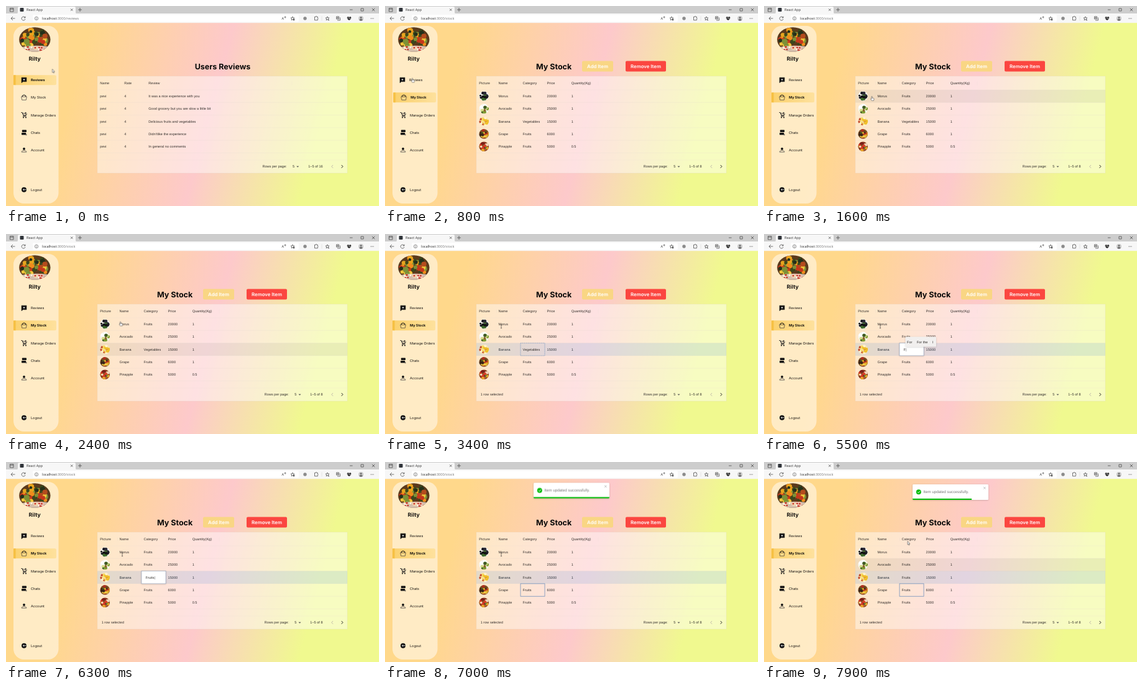
Recreate the animation shown at these times as an HTML page. Size 600 by 322 pixels, loop 8 s.

```html
<!DOCTYPE html>
<html lang="en">
<head>
<meta charset="utf-8">
<title>Stock dashboard</title>
<style>
html, body { margin: 0; height: 100%; overflow: hidden; }
svg { display: block; width: 100vw; height: 100vh; text-rendering: geometricPrecision; }
text { white-space: pre; }
.grid { font: 5.47px "Liberation Sans", Arial, sans-serif; letter-spacing: .01071em; fill: #2c2926; }
.ui { font: 5.5px Inter, sans-serif; fill: #151310; }
.bold { font-weight: 700; }
.title { font: 700 12.5px Inter, sans-serif; fill: #080808; }
.btn { font: 600 7.8px Inter, sans-serif; fill: #fff; }
.chrome { font: 5.6px "Open Sans", sans-serif; fill: #333; }
.toast-text { font: 6.25px "Liberation Sans", Arial, sans-serif; fill: #757575; }
.line { fill: none; stroke: #3c3c3c; stroke-width: .7; }
.rule { stroke: #dcd3cb; stroke-opacity: .55; stroke-width: .4; }

#cursor, #toast, #bar, .nudge-stock, .nudge-reviews, #caret { animation: 8s linear infinite; }
#cursor { animation-name: cursor; animation-timing-function: ease-in-out; }
@keyframes cursor {
  0%, 1.25% { transform: translate(74.5px, 101.5px); }
  5%, 7.5% { transform: translate(50px, 145px); }
  10%, 11% { transform: translate(43.5px, 116.5px); }
  18.75% { transform: translate(170px, 140px); }
  23.75%, 27% { transform: translate(192px, 184px); }
  30%, 33% { transform: translate(183.5px, 141.5px); }
  36.25%, 94% { transform: translate(187px, 149px); }
  98.5%, 100% { transform: translate(231px, 127.5px); }
}
.nudge-stock { animation-name: nudge-stock; }
@keyframes nudge-stock {
  0%, 3% { transform: none; }
  6%, 10% { transform: translateX(1.2px); }
  12%, 100% { transform: none; }
}
.nudge-reviews { animation-name: nudge-reviews; }
@keyframes nudge-reviews {
  0%, 7.5% { transform: none; }
  9.5%, 10.5% { transform: translateX(-1px); }
  12%, 100% { transform: none; }
}
#toast { animation-name: toast; animation-timing-function: cubic-bezier(.215, .61, .355, 1); }
@keyframes toast {
  0%, 80.84% { opacity: 0; transform: translateY(-1172px); }
  86.09% { opacity: 1; transform: translateY(9.8px); }
  87.4% { transform: translateY(-3.9px); }
  88.71% { transform: translateY(1.95px); }
  89.59%, 100% { opacity: 1; transform: none; }
}
#bar { transform-origin: 239px 0; animation-name: bar; }
@keyframes bar {
  0%, 89.4% { transform: none; }
  100% { transform: scaleX(.75); }
}
</style>
</head>
<body>
<svg id="stage" viewBox="0 0 600 322" preserveAspectRatio="none"></svg>
<script>
const LOOP = 8000, SWITCH = 600, PICK = 3000, EDIT = 4700, SAVE = 6400;
const sheet = document.head.appendChild(document.createElement('style'));
let windows = 0;

// Group that is visible only between two times
function during(from, to, body) {
  const name = 'w' + windows++, pct = ms => ms / LOOP * 100 + '%';
  sheet.textContent += `@keyframes ${name}{0%{opacity:0}${pct(from)}{opacity:1}${pct(to)}{opacity:0}}
    .${name}{animation:${name} 8s step-end infinite}`;
  return `<g class="${name}">${body}</g>`;
}
const text = (x, y, str, cls = 'grid', more = '') =>
  `<text x="${x}" y="${y}" class="${cls}" ${more}>${str}</text>`;
const rect = (x, y, w, h, fill, more = '') =>
  `<rect x="${x}" y="${y}" width="${w}" height="${h}" fill="${fill}" ${more}/>`;
const disc = (x, y, r, fill, more = '') =>
  `<circle cx="${x}" cy="${y}" r="${r}" fill="${fill}" ${more}/>`;
const path = (d, more = 'class="line"') => `<path d="${d}" ${more}/>`;
const at = (x, y, body, more = '') => `<g transform="translate(${x} ${y})" ${more}>${body}</g>`;

function random(seed) {
  return () => (seed = (seed * 16807) % 2147483647) / 2147483647;
}
// Soft heap of coloured blobs inside an ellipse
function heap(id, cx, cy, rx, ry, base, colours, count, size, seed) {
  const rnd = random(seed);
  let blobs = '';
  for (let i = 0; i < count; i++) {
    const a = rnd() * 6.283, d = Math.sqrt(rnd()) * .85;
    blobs += disc((cx + Math.cos(a) * d * rx).toFixed(1), (cy + Math.sin(a) * d * ry).toFixed(1),
      (size * (.6 + rnd() * .7)).toFixed(1), colours[i % colours.length]);
  }
  const oval = `<ellipse cx="${cx}" cy="${cy}" rx="${rx}" ry="${ry}"`;
  return `<clipPath id="${id}">${oval}/></clipPath>${oval} fill="${base}"/><g clip-path="url(#${id})">${blobs}</g>`;
}

function browser() {
  const url = page => text(58, 21.9, `<tspan fill="#222">localhost</tspan><tspan fill="#777">:3000/${page}</tspan>`, 'chrome');
  const star = 'M0-3 .9-1 3-.8 1.4.6 1.9 2.8 0 1.6-1.9 2.8-1.4.6-3-.8-.9-1Z';
  return rect(0, 0, 600, 13, '#cdcdcd') + rect(0, 12, 600, 15.2, '#f7f7f7')
    + path('M17 13Q19 12 19 10V3Q19 1 21 1H110Q112 1 112 3V10Q112 12 114 13Z', 'fill="#f7f7f7"')
    + rect(43, 14.3, 428, 11.2, '#fff', 'rx="2"')
    + path('M6.5 3.5H12V9H6.5ZM6.5 5.2H12') + rect(22.5, 3, 6, 6, '#30343a', 'rx="1"')
    + text(33, 8.2, 'React App', 'chrome')
    + path('M104 4.4 107.4 7.8M107.4 4.4 104 7.8M116 6H122M119 3V9')
    + path('M553 6H557.5M571 4H575V8H571ZM588.8 3.8 593.2 8.2M593.2 3.8 588.8 8.2')
    + path('M14.5 20H8M11 17 8 20 11 23')
    + path('M30.8 18.8A3 3 0 1 0 31 21M31 16.7V19H28.7')
    + at(49, 20, disc(0, 0, 2.7, 'none', 'stroke="#555" stroke-width=".6"') + path('M0-.4V1.5M0-1.5V-.9'))
    + during(0, SWITCH, url('reviews')) + during(SWITCH, LOOP, url('stock'))
    + text(443.5, 22, 'A', 'chrome') + path('M448 17Q449 18 448 19M449.2 16.4Q450.8 18 449.2 19.6')
    + at(461, 20, path(star) + disc(2, 2, 1.4, '#555'))
    + disc(481, 20, 2.7, '#8b8b8b')
    + path('M496.5 17.5H498A1 1 0 0 1 500 17.5H501.3V19.3A1 1 0 0 1 501.3 21.2V22.8H496.5Z')
    + path('M508 16.5V23.5', 'stroke="#ccc" stroke-width=".5"')
    + at(517, 20, path(star) + path('M1 2.7H3.2'))
    + path('M531.5 17H535.5V21H531.5ZM533 23H537.5V18.5M533.5 17.8V20.2M532.3 19H534.7')
    + path('M552 23C546 19 549.5 15.5 552 18C554.5 15.5 558 19 552 23Z', 'fill="#222"')
    + path('M549 19.7H551L552 18.5 553 21 554 19.7H555.5', 'fill="none" stroke="#fff" stroke-width=".5"')
    + disc(571, 20, 4, '#c9c9c9') + disc(571, 18.8, 1.4, '#666')
    + path('M568.2 22.6Q571 19 573.8 22.6Q571 25 568.2 22.6Z', 'fill="#666"')
    + [587, 589, 591].map(x => disc(x, 20, .55, '#333')).join('');
}

const icons = {
  reviews: path('M-4-4H4V2.6H-1.8L-4 4.6Z', 'stroke="#111" stroke-width=".5" stroke-linejoin="round"')
    + path('M0-2.5.6-1.1 2-.6.6-.1 0 1.4-.6-.1-2-.6-.6-1.1Z', 'fill="#fff"'),
  stock: path('M-4.3-1.2H4.3L3.3 4H-3.3Z')
    + path('M-2.8-1.2V-2.5Q0-5.5 2.8-2.5V-1.2', 'fill="none" stroke="#111" stroke-width="1.1"')
    + path('M-2 1.2H2M-2 2.6H2', 'stroke="#fde6b6" stroke-width=".5"'),
  orders: path('M-4.5-4H-2.9L-.8.8H3L4.4-2', 'fill="none" stroke="#111" stroke-width="1"')
    + path('M-2-2.8H1.2L2.4.8H-.6Z') + path('M-.6.8-1.5 2.4H3.6', 'fill="none" stroke="#111" stroke-width=".8"')
    + disc(-1, 4, .95, '#111') + disc(3, 4, .95, '#111') + path('M1.2-3.2H4M2.6-4.6V-1.8', 'stroke="#111" stroke-width=".8"'),
  chats: rect(-3.2, -4, 7.2, 3.5, '#111', 'rx=".8"') + rect(-4, .4, 7.2, 3.6, '#111', 'rx=".8"')
    + path('M2 3H4V4.6Z'),
  account: disc(0, -1.8, 1.9, '#111') + path('M-3.8 3.5V2.4Q0-.8 3.8 2.4V3.5Z'),
  logout: disc(0, 0, 4, '#111') + path('M3.5 0H-1.5M.2-1.6-1.6 0 .2 1.6', 'fill="none" stroke="#fff" stroke-width=".8"')
};

function menuItem(y, label, icon, active) {
  const glow = active
    ? rect(12, y - 8, 69, 16, 'url(#active)', 'rx="2.5"') + rect(12, y - 8, 3.6, 16, '#f6c043')
    : '';
  return glow + at(29, y, icons[icon], 'fill="#111"') + text(40, y + 2, label, active ? 'ui bold' : 'ui');
}

function sidebar() {
  const toggled = (y, label, icon, from, to) => {
    const on = during(from, to, menuItem(y, label, icon, true));
    const off = from ? during(0, from, menuItem(y, label, icon)) : during(to, LOOP, menuItem(y, label, icon));
    return `<g class="nudge-${icon}">${on}${off}</g>`;
  };
  const rnd = random(41);
  let berries = '';
  for (let i = 0; i < 16; i++) {
    berries += disc((31 + rnd() * 31).toFixed(1), (65 + rnd() * 7).toFixed(1), 1.3, i % 3 ? '#c92a20' : '#fff3e6');
  }
  return rect(12, 32, 72.5, 286, '#fff', 'rx="17" fill-opacity=".5"')
    + heap('avatar', 46.3, 54, 25.2, 19.8, '#5b3a1c',
      ['#e8a51e', '#3b481c', '#f0c63a', '#c6361c', '#24301a', '#ef8d1c', '#7d9136', '#b44b1d'], 72, 3.6, 977)
    + `<g clip-path="url(#avatar)">${path('M20 67Q46 61 73 66V76H20Z', 'fill="#f3dfd0" fill-opacity=".8"')}${berries}</g>`
    + text(46.2, 88.3, 'Rilty', 'ui', 'text-anchor="middle" style="font-size:8.7px;font-weight:700"')
    + toggled(119.2, 'Reviews', 'reviews', 0, SWITCH)
    + toggled(147.3, 'My Stock', 'stock', SWITCH, LOOP)
    + menuItem(175.5, 'Manage Orders', 'orders') + menuItem(203.6, 'Chats', 'chats')
    + menuItem(231.7, 'Account', 'account') + menuItem(295.7, 'Logout', 'logout');
}

const ROW = 20.3, TOP = 135;
const rowY = i => TOP + i * ROW;
const baseline = i => rowY(i) + 12.1;
const shade = (i, fill) => rect(147, rowY(i), 402, ROW, fill);

function table(cols, heads, rows, ends, total, shift) {
  let out = rect(147, 113, 402, 156, '#fff', 'fill-opacity=".45"')
    + rect(147, 113, 402, 156, 'none', 'class="rule"');
  for (let i = 0; i <= 5; i++) out += path(`M147 ${rowY(i)}H549`, 'class="rule"');
  out += path('M147 248H549', 'class="rule"');
  out += ends.map(x => path(`M${x} 121.5V127.5`, 'class="rule"')).join('');
  heads.forEach((h, c) => out += text(cols[c], 126.4, h));
  rows.forEach((row, i) => row.forEach((cell, c) => out += text(cols[c], baseline(i), cell)));
  return out + text(412.5 + shift, 260.4, 'Rows per page:') + text(461 + shift, 260.4, '5')
    + path(`M${467.2 + shift} 257.7h4l-2 2z`, 'fill="#555"')
    + text(509.6, 260.4, total, 'grid', 'text-anchor="end"')
    + path('M526 256 523.7 258.4 526 260.8', 'fill="none" stroke="#b3aaa2" stroke-width=".8"')
    + path('M539.6 256 541.9 258.4 539.6 260.8', 'fill="none" stroke="#111" stroke-width=".9"');
}

function reviews() {
  const notes = ['It was a nice experience with you', 'Good grocery but you are slow a little bit',
    'Delicious fruits and vegetables', 'Didn\'tlike the experience', 'In general no comments'];
  return text(348.5, 101.6, 'Users Reviews', 'title', 'text-anchor="middle"')
    + table([151.3, 190.3, 229.3], ['Name', 'Rate', 'Review'], notes.map(n => ['pevi', '4', n]), [460], '1–5 of 16', 0);
}

function pictures() {
  const looks = [
    ['#f2f0ec', ['#1b1b22', '#2b2a35', '#111', '#3f6a2c'], 20, 2.2],
    ['#f7f6ee', ['#7f9d35', '#d5dc8a', '#fff', '#3f5b22', '#8a5a2b'], 10, 2.4],
    ['#f7e3b4', ['#f0c02c', '#f7d95c', '#fff3d0', '#c4482a'], 18, 2.3],
    ['#7a4a1f', ['#e3a92a', '#b42a1e', '#4d5b22', '#f0d04a', '#3a2416'], 26, 2],
    ['#8a3b1c', ['#d63a24', '#e9a82a', '#61812f', '#f3d9c0', '#7c1f18'], 26, 2]
  ];
  return looks.map((look, i) => heap('pic' + i, 159.2, rowY(i) + 10.1, 7.8, 7.8, ...look, 301 + 77 * i)).join('');
}

function editor() {
  const typed = [['Vegetables', EDIT, 5100], ['', 5100, 5400], ['F', 5400, 5700], ['Fr', 5700, 5900],
    ['Fru', 5900, 6000], ['Frui', 6000, 6150], ['Fruit', 6150, 6280], ['Fruits', 6280, SAVE]];
  const words = [[230, 'For'], [245.7, 'For the'], [270.8, 'I']];
  const box = rect(218, rowY(2), 39, ROW, '#fff', 'stroke="#7d8fae" stroke-width=".5" filter="url(#lift)"');
  const entry = typed.map(([word, from, to]) => during(from, to,
    text(224.5, baseline(2), word + '<tspan fill="#555" dx=".1">|</tspan>'))).join('');
  const hints = rect(227.5, 165.5, 49.5, 16, '#f1efee', 'rx="1.5" filter="url(#lift)"')
    + words.map(([x, word]) => text(x, 175.9, word)).join('');
  return during(EDIT, SAVE, box + entry) + during(5400, 5900, hints);
}

function stock() {
  const rows = [['Morus', 'Fruits', '20000', '1'], ['Avocado', 'Fruits', '25000', '1'], ['Banana', '', '15000', '1'],
    ['Grape', 'Fruits', '6000', '1'], ['Pinapple', 'Fruits', '5000', '0.5']];
  const hover = (i, from, to) => during(from, to, shade(i, 'rgba(0,0,0,.055)'));
  const focus = (i, more) => rect(218, rowY(i), 39, ROW, 'none', `stroke="#5f86b8" ${more}`);
  return text(243, 101.6, 'My Stock', 'title')
    + rect(317, 88.6, 50, 17, '#f9d684', 'rx="2"') + text(342, 99.9, 'Add Item', 'btn', 'text-anchor="middle"')
    + rect(387, 88.6, 65, 17, '#fb4640', 'rx="2"') + text(419.5, 99.9, 'Remove Item', 'btn', 'text-anchor="middle"')
    + table([151.3, 182.5, 221.6, 260.6, 299.7], ['Picture', 'Name', 'Category', 'Price', 'Quantity(Kg)'],
      rows.map(r => ['', ...r]), [179.5, 218.5, 257.5, 343], '1–5 of 8', 3.3)
    + hover(0, 1500, 1700) + hover(1, 1700, 1900) + hover(2, 1900, PICK) + hover(1, 7700, LOOP)
    + during(PICK, LOOP, shade(2, 'rgba(25,118,210,.12)') + text(153.7, 260.4, '1 row selected'))
    + pictures()
    + during(SWITCH, SAVE, text(221.6, baseline(2), 'Vegetables'))
    + during(SAVE, LOOP, text(221.6, baseline(2), 'Fruits'))
    + during(PICK, EDIT, focus(2, 'stroke-width=".6" stroke-dasharray="1 .5"'))
    + during(SAVE, LOOP, focus(3, 'stroke-width=".7"'))
    + editor();
}

function toast() {
  return `<g id="toast">${rect(239, 36, 122, 25, '#fff', 'rx="1.6" filter="url(#lift)"')}`
    + `<g clip-path="url(#toast-clip)">${rect(239, 58.9, 122, 2.1, '#07bc0c', 'id="bar"')}</g>`
    + disc(248.8, 48.2, 4, '#07bc0c')
    + path('M246.8 48.3 248.3 49.8 251 46.8', 'fill="none" stroke="#fff" stroke-width=".9"')
    + text(256.3, 50.3, 'Item updated successfully.', 'toast-text')
    + path('M353 40 356.6 43.6M356.6 40 353 43.6', 'stroke="#999" stroke-width=".6"') + '</g>';
}

function cursor() {
  const skin = 'fill="#fff" stroke="#222" stroke-width=".5" stroke-linejoin="round"';
  const arrow = path('M0 0V5.6L1.3 4.5 2.1 6.4 3 6 2.2 4.2H3.9Z', skin);
  const hand = path('M0 0Q.8-.6 1.2.2V2.3L3.6 2.9Q4.2 3.2 4 4.3L3.4 6.6H.4L-1.4 4Q-1.3 3 0 3.7Z', skin);
  const beam = path('M-1.1-2.8Q0-2.8 0-2.2 0-2.8 1.1-2.8M0-2.2V2.2M-1.1 2.8Q0 2.8 0 2.2 0 2.8 1.1 2.8',
    'fill="none" stroke="#222" stroke-width=".6"');
  const plan = [[arrow, 0, 250], [hand, 250, 1000], [arrow, 1000, 1500], [hand, 1500, 2800],
    [beam, 2800, 7600], [arrow, 7600, LOOP]];
  return `<g id="cursor">${plan.map(([shape, from, to]) => during(from, to, shape)).join('')}</g>`;
}

document.getElementById('stage').innerHTML = `<defs>
  <linearGradient id="sky" gradientUnits="userSpaceOnUse" x1="-17" y1="89.5" x2="617" y2="259.5">
    <stop offset=".2" stop-color="#ffd88b"/><stop offset=".54" stop-color="#fdc9cb"/><stop offset=".81" stop-color="#f0f98f"/>
  </linearGradient>
  <linearGradient id="active"><stop stop-color="#fbd06b"/><stop offset="1" stop-color="#fee19d"/></linearGradient>
  <filter id="lift" x="-20%" y="-30%" width="140%" height="170%">
    <feDropShadow dx="0" dy=".6" stdDeviation="1" flood-opacity=".22"/>
  </filter>
  <clipPath id="page"><rect y="27" width="600" height="295"/></clipPath>
  <clipPath id="toast-clip"><rect x="239" y="36" width="122" height="25" rx="1.6"/></clipPath>
</defs>`
  + rect(0, 27, 600, 295, 'url(#sky)') + sidebar()
  + during(0, SWITCH, reviews()) + during(SWITCH, LOOP, stock())
  + `<g clip-path="url(#page)">${toast()}</g>` + browser() + cursor();
</script>
</body>
</html>
```
